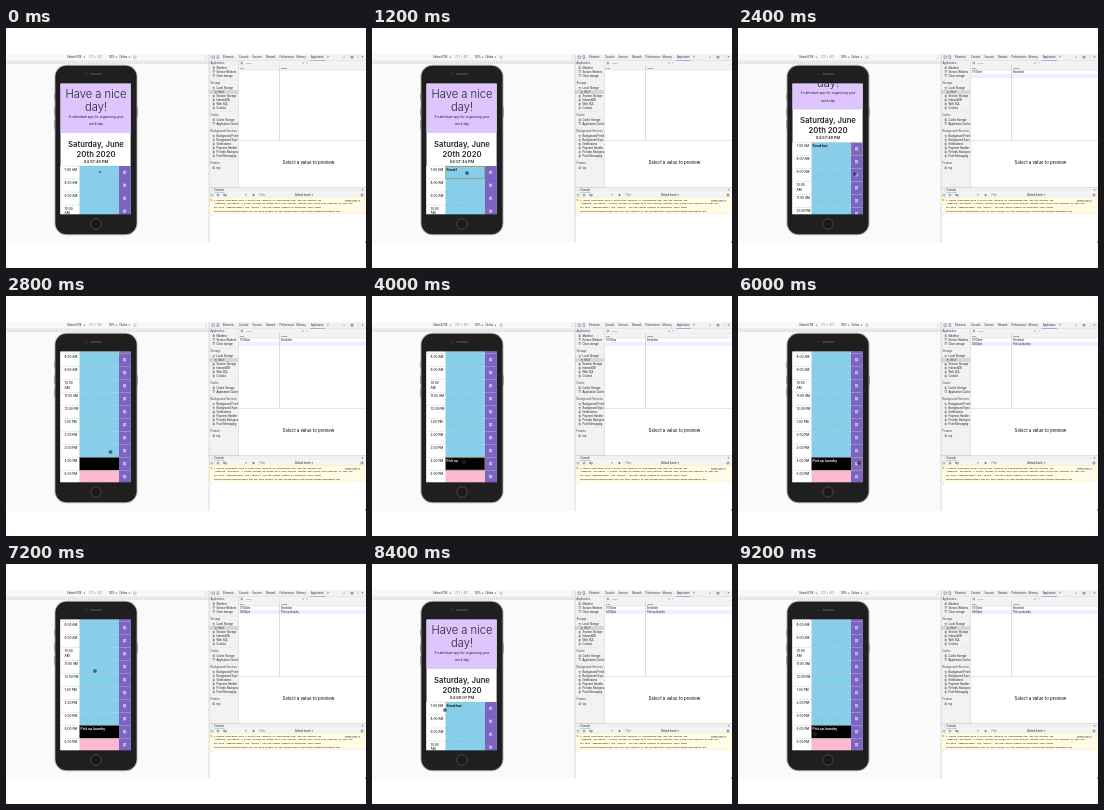
Animation, 360 px wide and 240 px high, one loop 9600 ms. Source, as an HTML page with a canvas:

```html
<!DOCTYPE html>
<html lang="en">
<head>
<meta charset="utf-8">
<title>Day planner demo</title>
<style>
html, body { margin: 0; width: 100%; height: 100%; overflow: hidden; background: #fff; }
canvas { display: block; width: 360px; height: 240px; }
</style>
</head>
<body>
<canvas id="stage"></canvas>
<script>
const LOOP = 9600, STEP = 400;
const SANS = '"Liberation Sans", Arial, sans-serif';
const PAGE = 'Inter, sans-serif';
const MONO = '"Liberation Mono", monospace';
const SCREEN = { x: 54.3, y: 55.5, w: 70.5, h: 130.7 };
const ROW_TOP = 138, ROW_H = 13;
const canvas = document.getElementById('stage');
const ctx = canvas.getContext('2d');
const ratio = window.devicePixelRatio || 1;
canvas.width = 360 * ratio;
canvas.height = 240 * ratio;

// Keyframes: [time, value, ...]
const scrollKeys = [[0, 0], [2000, 0], [2400, 23.5], [2800, 93.6], [7200, 93.6], [8000, 0], [8400, 0], [9200, 93.6]];
const pointerKeys = [[0, 94, 144], [1200, 95, 145], [1600, 118, 143], [2400, 117, 146], [3200, 92, 166],
  [4800, 92, 166], [5600, 121, 167], [6000, 121, 167], [6800, 89, 107], [7600, 89, 107], [8400, 73, 146], [9200, 77, 170]];

function sample(keys, t) {
  const i = keys.findIndex(k => k[0] > t);
  if (i < 0) return keys[keys.length - 1].slice(1);
  const a = keys[i - 1], b = keys[i], p = (t - a[0]) / (b[0] - a[0]);
  return a.slice(1).map((v, j) => v + (b[j + 1] - v) * p);
}

function rect(x, y, w, h, color) {
  ctx.fillStyle = color;
  ctx.fillRect(x, y, w, h);
}

function rounded(x, y, w, h, r, color) {
  ctx.fillStyle = color;
  ctx.beginPath();
  ctx.roundRect(x, y, w, h, r);
  ctx.fill();
}

function frame(x, y, w, h, color, width = 0.6) {
  ctx.strokeStyle = color;
  ctx.lineWidth = width;
  ctx.strokeRect(x, y, w, h);
}

function circle(x, y, r, fill, stroke) {
  ctx.beginPath();
  ctx.arc(x, y, r, 0, Math.PI * 2);
  if (fill) { ctx.fillStyle = fill; ctx.fill(); }
  if (stroke) { ctx.strokeStyle = stroke; ctx.lineWidth = 0.7; ctx.stroke(); }
}

// y is the vertical middle of the line
function text(str, x, y, size, color = '#222', { align = 'left', weight = 400, font = SANS } = {}) {
  ctx.font = `${weight} ${size}px ${font}`;
  ctx.textAlign = align;
  ctx.textBaseline = 'alphabetic';
  ctx.fillStyle = color;
  ctx.fillText(str, x, y + size * 0.35);
}

function caret(x, y) {
  ctx.fillStyle = '#555';
  ctx.beginPath();
  ctx.moveTo(x, y - 0.5);
  ctx.lineTo(x + 1.8, y - 0.5);
  ctx.lineTo(x + 0.9, y + 0.8);
  ctx.fill();
}

function drawDeviceBar() {
  rect(0, 26, 203, 189, '#fafafa');
  rect(0, 26, 203, 6, '#f8f8f8');
  rect(0, 32, 203, 4, '#eeeeee');
  for (let x = 2; x < 203; x += 2) rect(x, 33.5, 0.5, 2.5, '#cfcfcf');
  text('Velora 6/7/8', 61, 29.2, 2.7);
  caret(77.5, 29.3);
  text('375  ×  667', 83, 29.2, 2.6, '#888');
  text('50%', 103, 29.2, 2.7);
  caret(109.5, 29.3);
  text('Online', 113.5, 29.2, 2.7);
  caret(122.5, 29.3);
  frame(128, 28, 2, 2.5, '#888', 0.4);
  for (let i = 0; i < 3; i++) circle(200, 27.8 + i * 1.3, 0.35, '#777');
}

function drawPhone() {
  const buttons = '#8a8a8a';
  rounded(48, 65, 1, 7, 0.5, buttons);
  rounded(48, 79, 1, 9, 0.5, buttons);
  rounded(48, 92, 1, 9, 0.5, buttons);
  rounded(131, 79, 1, 10, 0.5, buttons);
  rounded(48.5, 36.8, 83, 170.4, 12, '#b4b4b4');
  rounded(49.4, 37.7, 81.2, 168.6, 11.2, '#1f1f1f');
  circle(90, 41.5, 0.8, '#383838');
  circle(80, 46, 1.1, '#30343c');
  rounded(84, 45.2, 12, 1.5, 0.8, '#484848');
  circle(90, 196, 5.2, '#1a1a1a', '#5a5a5a');
}

function saveIcon(x, y) {
  frame(x - 1.2, y - 1.2, 2.4, 2.4, '#ddd4f4', 0.6);
  rect(x - 0.7, y - 1, 1.2, 0.8, '#ddd4f4');
  circle(x, y + 0.5, 0.5, '#ddd4f4');
}

function drawRow(hour, y, note, focus) {
  const color = hour < 16 ? '#87ceeb' : hour === 16 ? '#000' : '#fbbad2';
  const label = `${(hour + 11) % 12 + 1}:00`, half = hour < 12 ? 'AM' : 'PM';
  const style = { font: PAGE, weight: 500 };
  rect(54, y, 19.5, ROW_H, '#fff');
  rect(73.5, y, 39.5, ROW_H, color);
  rect(113, y, 12, ROW_H, '#7c64c2');
  ctx.setLineDash([1, 0.8]);
  ctx.lineWidth = 0.4;
  ctx.strokeStyle = '#8f9ca0';
  ctx.beginPath();
  ctx.moveTo(57, y);
  ctx.lineTo(113, y);
  ctx.stroke();
  ctx.setLineDash([]);
  if (hour === 10) {
    text(label, 58.6, y + 3.7, 3.1, '#222', style);
    text(half, 58.6, y + 8.3, 3.1, '#222', style);
  } else {
    text(`${label} ${half}`, 58.6, y + 3.7, 3.1, '#222', style);
  }
  text(note, 74.5, y + 3.5, 3.3, hour === 16 ? '#fff' : '#111', { font: PAGE, weight: 600 });
  saveIcon(118.6, y + 6.3);
  if (focus === 'note') frame(73.8, y + 0.4, 39, ROW_H - 0.8, '#a58b35', 0.6);
  if (focus === 'save') frame(113.4, y + 0.5, 11, ROW_H - 1, '#c28f62', 0.5);
}

function drawPage(t) {
  const [scroll] = sample(scrollKeys, t);
  const typed = (str, start, pace) => str.slice(0, Math.max(0, Math.floor((t - start) / pace)));
  const notes = { 7: typed('Breakfast', 400, 130), 16: typed('Pick up laundry', 3300, 100) };
  const focus = {
    7: t >= 400 && t < 2000 ? 'note' : t >= 2000 && t < 3200 ? 'save' : '',
    16: t >= 3200 && t < 5600 ? 'note' : t >= 5600 && t < 6800 ? 'save' : ''
  };
  const seconds = Math.floor(40.3 + t * 0.00325);
  const clock = `04:${57 + Math.floor(seconds / 60)}:${String(seconds % 60).padStart(2, '0')} PM`;
  const centered = (str, y, size, weight) => text(str, 90, y, size, '#212529', { align: 'center', font: PAGE, weight });

  ctx.save();
  ctx.beginPath();
  ctx.rect(SCREEN.x, SCREEN.y, SCREEN.w, SCREEN.h);
  ctx.clip();
  rect(SCREEN.x, SCREEN.y, SCREEN.w, SCREEN.h, '#fff');
  ctx.translate(0, -scroll);
  rect(SCREEN.x, 54, SCREEN.w, 51, '#dfc5fd');
  centered('Have a nice', 66, 11.2, 300);
  centered('day!', 79, 11.2, 300);
  centered('A calendare app for organizing your', 88.5, 3.25, 400);
  centered('work day', 96, 3.25, 400);
  centered('Saturday, June', 116.3, 7.7, 600);
  centered('20th 2020', 126, 7.7, 600);
  centered(clock, 133.3, 3.9, 600);
  for (let hour = 7; hour <= 17; hour++) {
    drawRow(hour, ROW_TOP + (hour - 7) * ROW_H, notes[hour] || '', focus[hour]);
  }
  ctx.restore();

  const [x, y] = sample(pointerKeys, t);
  circle(x, y, t < STEP ? 0.7 : 1.6, 'rgba(25,25,35,.6)', 'rgba(70,70,75,.7)');
}

const sidebar = [
  ['Application', 35, 'Manifest', 'Service Workers', 'Clear storage'],
  ['Storage', 55.5, 'Local Storage', 'file://', 'Session Storage', 'IndexedDB', 'Web SQL', 'Cookies'],
  ['Cache', 87, 'Cache Storage', 'Application Cache'],
  ['Background Services', 103.5, 'Background Fetch', 'Background Sync', 'Notifications', 'Payment Handler',
    'Periodic Background', 'Push Messaging'],
  ['Frames', 135, 'top']
];

function drawSidebar() {
  rect(203, 33, 29.5, 127, '#f2f2f2');
  rect(203, 62, 29.5, 4, '#d6d6d6');
  for (const [title, top, ...items] of sidebar) {
    if (top > 40) rect(203, top - 3.7, 29.5, 0.4, '#e0e0e0');
    text(title, 204.5, top, 2.8, '#444');
    items.forEach((item, i) => {
      const y = top + 4.8 + i * 3.95, indent = item === 'file://' ? 2 : 0;
      frame(207 + indent, y - 1, 1.7, 2, '#777', 0.45);
      text(item, 210.5 + indent, y, 2.7);
    });
  }
  // Hide labels that run past the pane
  rect(232.5, 33, 127.5, 127, '#fff');
  rect(232.3, 33, 0.5, 127, '#ccc');
}

function drawStorage(t) {
  rect(233, 33, 127, 4, '#f3f3f3');
  circle(235.8, 35, 0.9, null, '#777');
  text('Filter', 240, 35, 2.5, '#777');
  text('⊘   ×', 296, 35, 2.6, '#777');
  rect(233, 37.2, 127, 0.4, '#ccc');
  rect(233, 37.6, 127, 4.2, '#f3f3f3');
  text('Key', 234, 39.8, 2.5);
  text('Value', 275, 39.8, 2.5);
  rect(233, 41.8, 127, 0.4, '#ccc');
  if (t >= 2000) {
    rect(233, 46, 127, 4, '#eaf2fd');
    text('07:00am', 234, 44, 2.6);
    text('Breakfast', 275, 44, 2.6);
  }
  if (t >= 5600) {
    text('04:00pm', 234, 48, 2.6);
    text('Pick up laundry', 275, 48, 2.6);
  }
  rect(273.5, 37.5, 0.5, 75, '#bbb');
  rect(233, 112, 127, 0.5, '#ccc');
  text('Select a value to preview', 302.5, 134.5, 4.35, '#222', { align: 'center', font: PAGE, weight: 500 });
}

const warning = [
  'A cookie associated with a cross-site resource at fontawesome.com/ was set without the',
  '`SameSite` attribute. A future release of Chrome will only deliver cookies with cross-site requests if they are',
  'set with `SameSite=None` and `Secure`. You can review cookies in developer tools under',
  'Application>Storage>Cookies and see more details at www.chromestatus.com/feature/5088147346030592 and'
];

function drawConsole() {
  rect(203, 159.5, 157, 0.5, '#bbb');
  rect(203, 160, 157, 4.5, '#f1f1f1');
  text('⋮', 205, 162.3, 2.8);
  text('Console', 208.5, 162.3, 2.6);
  rect(208, 164, 11, 0.6, '#4285f4');
  text('×', 355.5, 162.2, 3.4);
  rect(203, 164.6, 157, 4.7, '#f3f3f3');
  frame(205, 166, 2, 2, '#777', 0.4);
  circle(212, 167, 1, null, '#777');
  text('top', 217, 167, 2.6);
  caret(239, 167);
  circle(247.5, 167, 0.9, '#666');
  text('Filter', 253.5, 167, 2.6, '#777');
  text('Default levels', 289, 167, 2.6);
  caret(305.5, 167);
  circle(356, 167, 1.1, null, '#666');
  rect(203, 169.3, 157, 15.7, '#fffbe5');
  rect(203, 169.1, 157, 0.4, '#eee2b0');
  rect(203, 185, 157, 0.4, '#eee2b0');
  rounded(204.3, 170.9, 2, 2, 0.8, '#eeb400');
  warning.forEach((line, i) => text(line, 208, 172 + i * 3.7, 2.1, '#4d3a08', { font: MONO, weight: 700 }));
  text('index.html:1', 354, 172, 2.1, '#444', { align: 'right', font: MONO, weight: 700 });
  rect(339, 173.1, 15, 0.25, '#444');
  text('›', 205, 187.5, 3.4, '#3b78e7');
}

function drawDevtools(t) {
  rect(203, 26, 157, 189, '#fff');
  rect(203, 26, 157, 6.7, '#f1f1f1');
  frame(206, 28, 2.4, 2.4, '#666', 0.5);
  frame(211, 27.8, 1.8, 2.8, '#4285f4', 0.6);
  const tabs = { Elements: 217, Console: 233, Sources: 246.5, Network: 260, Performance: 273.5, Memory: 290.5, Application: 305 };
  for (const name in tabs) text(name, tabs[name], 29.3, 2.55, '#333');
  rect(304, 32, 15, 0.7, '#4285f4');
  text('»', 321, 29.2, 3);
  circle(338, 29.2, 0.8, '#e8b000');
  circle(346, 29.2, 1, null, '#555');
  text('⋮', 351, 29.2, 3);
  text('×', 355.5, 29.2, 3.4);
  rect(203, 32.6, 157, 0.4, '#ccc');
  drawSidebar();
  drawStorage(t);
  drawConsole();
  rect(202.8, 26, 0.5, 189, '#bbb');
  rect(359, 213.5, 1, 1, '#555');
}

function draw(t) {
  ctx.setTransform(ratio, 0, 0, ratio, 0, 0);
  rect(0, 0, 360, 240, '#fff');
  drawDeviceBar();
  drawPhone();
  drawPage(t);
  drawDevtools(t);
}

function tick() {
  draw(Math.floor(performance.now() % LOOP / STEP) * STEP);
  requestAnimationFrame(tick);
}
tick();
</script>
</body>
</html>
```
